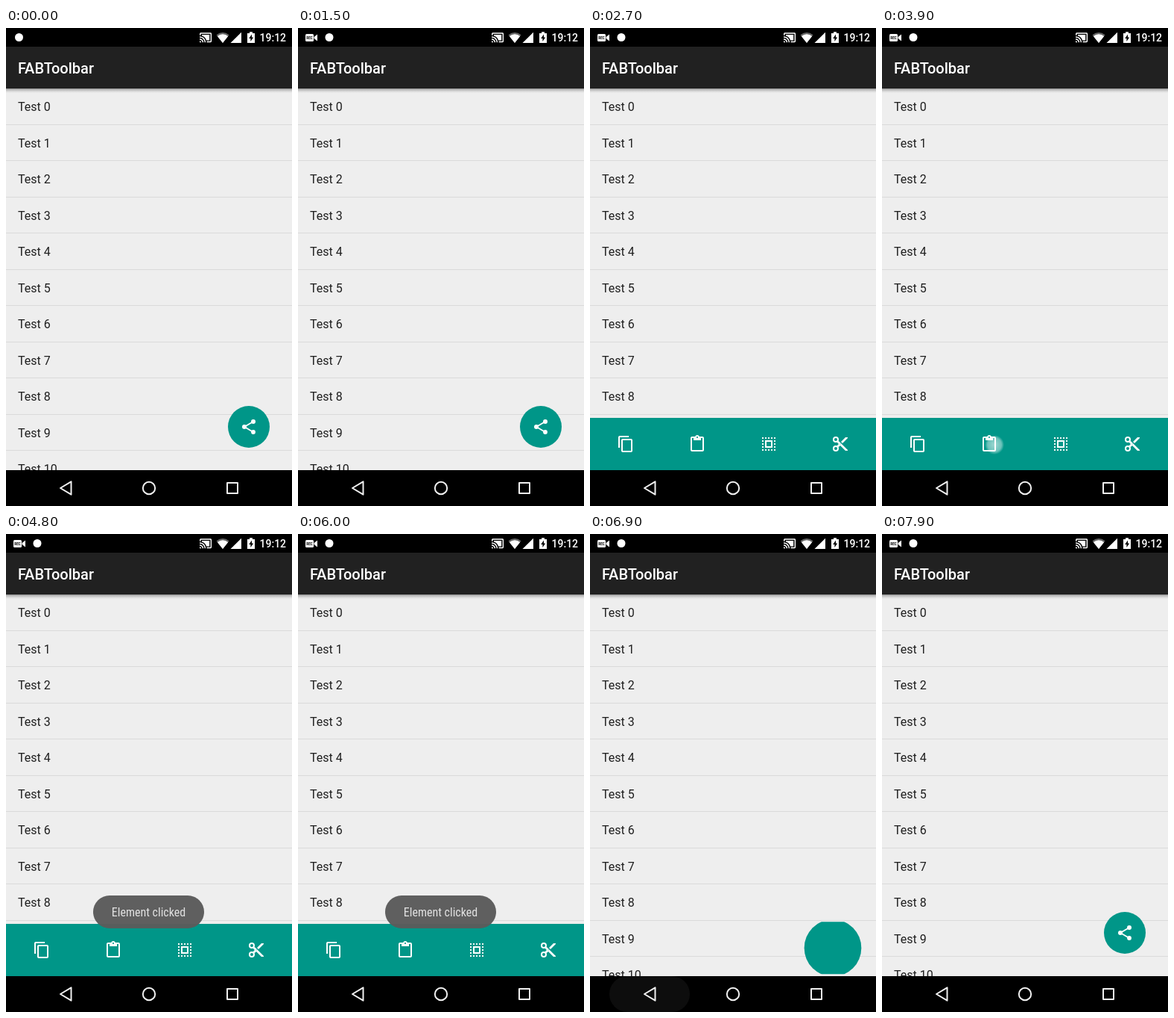
An HTML page that plays this animation: 384 px wide and 640 px high, repeating every 8000 ms.

```html
<!DOCTYPE html>
<html lang="en">
<head>
<meta charset="utf-8">
<title>Expanding toolbar</title>
<style>
  html, body { margin: 0; width: 100%; height: 100%; overflow: hidden; background: #000; }
  svg { display: block; }
  text { font-family: Roboto, sans-serif; }
  .medium { font-weight: 500; fill: #fff; }
  #rows text { font-size: 16px; fill: #1f1f1f; }
  #rows rect { fill: #dadada; }
  #toast text { font: 16px "Roboto Condensed", Roboto, sans-serif; fill: #e2e2e2; }
  .line { fill: none; stroke: #f0f0f0; stroke-width: 2; stroke-linejoin: round; }
</style>
</head>
<body>
<svg width="384" height="640" viewBox="0 0 384 640">
  <defs>
    <linearGradient id="shade" x2="0" y2="1">
      <stop offset="0" stop-color="#000" stop-opacity=".36"/>
      <stop offset=".5" stop-color="#000" stop-opacity=".12"/>
      <stop offset="1" stop-color="#000" stop-opacity="0"/>
    </linearGradient>
    <radialGradient id="glow">
      <stop offset="0" stop-color="#fff" stop-opacity=".62"/>
      <stop offset=".72" stop-color="#fff" stop-opacity=".42"/>
      <stop offset="1" stop-color="#fff" stop-opacity="0"/>
    </radialGradient>
    <clipPath id="band"><rect id="bandBox" width="384" height="70"/></clipPath>
  </defs>

  <rect width="384" height="640" fill="#eee"/>
  <g id="rows"></g>
  <rect y="81" width="384" height="6" fill="url(#shade)"/>

  <g clip-path="url(#band)"><circle id="disc" fill="#009688"/></g>
  <g id="share" fill="#fff" transform="translate(314 522)">
    <path d="M18 5 6 12l12 7" fill="none" stroke="#fff" stroke-width="1.8"/>
    <circle cx="18" cy="5" r="3"/><circle cx="6" cy="12" r="3"/><circle cx="18" cy="19" r="2.92"/>
  </g>
  <g id="tools" fill="#fff">
    <g><path d="M16 1H4c-1.1 0-2 .9-2 2v14h2V3h12V1zm3 4H8c-1.1 0-2 .9-2 2v14c0 1.1.9 2 2 2h11c1.1 0 2-.9 2-2V7c0-1.1-.9-2-2-2zm0 16H8V7h11v14z"/></g>
    <g><path d="M19 2h-4.18C14.4.84 13.3 0 12 0c-1.3 0-2.4.84-2.82 2H5c-1.1 0-2 .9-2 2v16c0 1.1.9 2 2 2h14c1.1 0 2-.9 2-2V4c0-1.1-.9-2-2-2zm-7 0c.55 0 1 .45 1 1s-.45 1-1 1-1-.45-1-1 .45-1 1-1zm7 18H5V4h2v3h10V4h2v16z"/></g>
    <g fill="none" stroke="#fff" stroke-width="2">
      <rect x="4" y="4" width="16" height="16" stroke-dasharray="2" stroke-dashoffset="1"/>
      <rect x="8" y="8" width="8" height="8"/>
    </g>
    <g>
      <g fill="none" stroke="#fff" stroke-width="2"><circle cx="6" cy="6" r="3"/><circle cx="6" cy="18" r="3"/></g>
      <path d="M9.64 7.64 7.64 9.64 10 12l-2.36 2.36 2 2L12 14l7 7h3v-1zM19 3l-6 6 2 2 7-7V3z"/>
      <circle cx="12" cy="12" r=".5" fill="#009688"/>
    </g>
  </g>

  <g id="toast">
    <rect x="117" y="484" width="149" height="44" rx="22" fill="#5b5b5b" fill-opacity=".97"/>
    <text x="191.5" y="512" text-anchor="middle">Element clicked</text>
  </g>

  <rect width="384" height="25"/>
  <rect y="25" width="384" height="56" fill="#212121"/>
  <text class="medium" x="16" y="61" font-size="20">FABToolbar</text>

  <g fill="#fff">
    <g id="rec">
      <rect x="10" y="8" width="11" height="10" rx="1.5"/>
      <path d="M21.5 12l4.5-3.5v9L21.5 14z"/>
      <text x="15.5" y="14.8" font-size="4.6" font-weight="700" text-anchor="middle" fill="#000">REC</text>
    </g>
    <circle id="badge" cy="12.5" r="5.5"/>
    <path transform="translate(259.3 4) scale(.73)" d="M21 3H3c-1.1 0-2 .9-2 2v3h2V5h18v14h-7v2h7c1.1 0 2-.9 2-2V5c0-1.1-.9-2-2-2zM1 18v3h3c0-1.66-1.34-3-3-3zm0-4v2c2.76 0 5 2.24 5 5h2c0-3.87-3.13-7-7-7zm0-4v2c4.97 0 9 4.03 9 9h2c0-6.08-4.93-11-11-11zM19 7H5v1.63c3.96 1.28 7.09 4.41 8.37 8.37H19V7z"/>
    <path d="M291 20 282.5 9.3Q291 2.7 299.5 9.3z" fill="#666"/>
    <path d="M291 20 283.8 11Q291 5.6 298.2 11z"/>
    <path d="M301.5 20H316V5.8z"/>
    <path d="M324 7h3V5.3h4V7h3v13h-10z"/>
    <path d="M330 8.6 326.2 14h2.2v4l3.8-5.6H330z" fill="#000"/>
  </g>
  <text class="medium" x="340.5" y="18" font-size="14">19:12</text>

  <rect y="592" width="384" height="48"/>
  <rect id="ripple" x="26" y="592" width="108" height="48" rx="24" fill="#fff"/>
  <g class="line">
    <path d="M73 616l14.5-8.7v17.4z"/>
    <circle cx="192" cy="616" r="8.2"/>
    <rect x="297" y="609" width="14" height="14"/>
  </g>
  <circle id="touch" r="13" fill="url(#glow)"/>
</svg>

<script>
const LOOP = 8000, STEP = 100;
const SHOW = 1850, HIDE_END = 6990, MORPH = 365;
const TOUCHES = [
  { from: 1700, to: 1900, x: 327, y: 535 },
  { from: 3800, to: 4100, x: 151, y: 558 },
  { from: 6400, to: 6600, x: 81, y: 617 }
];

const $ = id => document.getElementById(id);
const clamp = v => Math.min(1, Math.max(0, v));
const ramp = (t, from, to) => clamp((t - from) / (to - from));
const mix = (a, b, k) => a + (b - a) * k;
const set = (id, attrs) => {
  for (const key in attrs) $(id).setAttribute(key, attrs[key]);
};

const PITCH = 48.5;
$('rows').innerHTML = Array.from({ length: 11 }, (_, i) =>
  `<text x="16" y="${Math.round(111 + i * PITCH)}">Test ${i}</text>
   <rect y="${Math.floor(129 + i * PITCH)}" width="384" height="1"/>`).join('');

// Without a condensed face, the regular one needs a smaller size.
const label = document.querySelector('#toast text');
if (label.getComputedTextLength() > 105) label.style.fontSize = '14px';

// 0 = round button, 1 = full toolbar
function spread(t) {
  return t < 4000 ? ramp(t, SHOW, SHOW + MORPH)
                  : 1 - ramp(t, HIDE_END - MORPH, HIDE_END);
}

function draw(t) {
  const u = spread(t);
  const x = mix(326, 192, clamp((u - .25) / .62));
  const y = mix(534, 557, clamp(u / .28));
  set('disc', { cx: x, cy: y, r: 28 + 170 * u * u });
  set('bandBox', { y: y - 35 });

  set('share', { opacity: t < 4000 ? 1 - ramp(t, 1800, 1900) : ramp(t, 6950, 7150) });

  const shown = ramp(t, 2150, 2500) * (1 - ramp(t, 6450, 6620));
  set('tools', { opacity: shown });
  [...$('tools').children].forEach((icon, i) => icon.setAttribute('transform',
    `translate(${48 + 96 * i} 557) scale(${shown}) translate(-12 -12)`));

  set('toast', { opacity: ramp(t, 4050, 4250) * (1 - ramp(t, 6160, 6360)) });
  set('ripple', { opacity: .2 * ramp(t, 6350, 6500) * (1 - ramp(t, 6600, 7000)) });

  const recording = t >= 100;
  set('rec', { opacity: +recording });
  set('badge', { cx: recording ? 42 : 17.5 });

  const press = TOUCHES.find(p => t >= p.from && t < p.to);
  set('touch', { opacity: press ? 1 : 0, cx: press ? press.x : 0, cy: press ? press.y : 0 });
}

const start = performance.now();
function tick() {
  const t = (performance.now() - start) % LOOP;
  draw(Math.floor(t / STEP) * STEP);
  requestAnimationFrame(tick);
}
tick();
</script>
</body>
</html>
```
